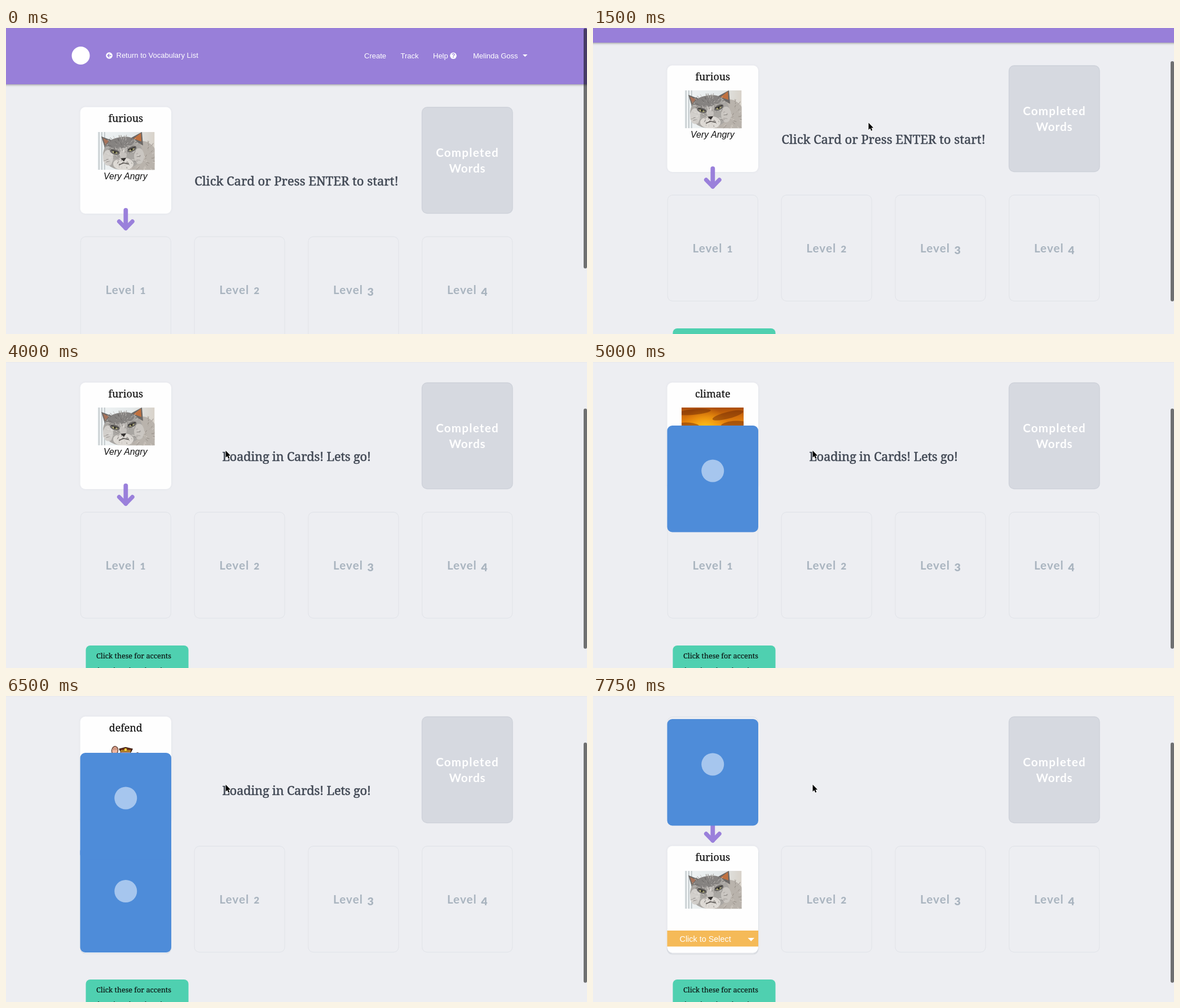
An HTML page with a canvas that plays this animation: 1030x544 px, repeating every 8000 ms.

```html
<!DOCTYPE html>
<html lang="en">
<head>
<meta charset="utf-8">
<title>Vocabulary cards</title>
<style>
html, body { margin: 0; width: 100%; height: 100%; overflow: hidden; background: #edeef2; }
canvas { display: block; }
</style>
</head>
<body>
<canvas id="stage" width="1030" height="544"></canvas>
<script>
const ctx = document.getElementById('stage').getContext('2d');
const LOOP = 8000, STEP = 250;
const SERIF = '"Noto Serif", serif';
const SANS = '"Liberation Sans", Arial, sans-serif';
const ROUND = 'Lato, sans-serif';
const PURPLE = '#987fd9', BLUE = '#4e8cd9', BG = '#edeef2';
const CARD_W = 161.5, CARD_H = 189.5, DECK_X = 131.5, DECK_Y = 140.5, LEVEL_Y = 370.5, PITCH = 201.8;

// Held values: each entry is [start time, value].
const scrollKeys = [[0, 0], [1250, 1], [1500, 74], [1750, 98], [2000, 105.5], [2250, 104]];
const pointerKeys = [[0, null], [250, [484, 38]], [500, [488, 168]], [2500, [282, 167]],
  [2750, [259, 165]], [3750, [307, 164]], [4000, [389, 157]]];
const messageKeys = [[0, 'Click Card or Press ENTER to start!'], [3250, 'Loading in Cards! Lets go!'], [7750, '']];
const deckKeys = [[0, 'furious'], [4750, 'climate'], [6250, 'defend'], [7750, null]];
const flightKeys = [[0, null], [4750, 47], [5000, 113], [5250, 208], [5500, 262], [5750, null],
  [6250, 43], [6500, 101], [6750, 197], [7000, 256], [7250, null], [7750, 41]];
const arrowKeys = [[0, 0], [6250, 3], [6500, 0], [7750, 5]];
const stackKeys = [[0, 0], [5750, 1], [6500, 2], [7250, 3]];

function at(keys, t) {
  let value = keys[0][1];
  for (const [start, v] of keys) if (t >= start) value = v;
  return value;
}

function seeded(seed) {
  return () => (seed = (seed * 16807) % 2147483647) / 2147483647;
}

function text(str, x, y, font, color, align = 'left', spacing = 0) {
  ctx.font = font;
  ctx.fillStyle = color;
  ctx.textAlign = align;
  ctx.letterSpacing = spacing + 'px';
  ctx.fillText(str, x, y);
}

// Serif text with a hairline outline for a medium weight.
function serif(str, x, y, size, color, weight, align = 'center', spacing = 0) {
  text(str, x, y, size + 'px ' + SERIF, color, align, spacing);
  ctx.strokeStyle = color;
  ctx.lineWidth = weight;
  ctx.strokeText(str, x, y);
}

function box(x, y, w, h, r, fill, stroke) {
  ctx.beginPath();
  ctx.roundRect(x, y, w, h, r);
  if (fill) { ctx.fillStyle = fill; ctx.fill(); }
  if (stroke) { ctx.strokeStyle = stroke; ctx.lineWidth = 1.3; ctx.stroke(); }
}

function oval(x, y, rx, ry, fill, turn = 0) {
  ctx.beginPath();
  ctx.ellipse(x, y, rx, ry, turn, 0, Math.PI * 2);
  ctx.fillStyle = fill;
  ctx.fill();
}

function poly(points, fill) {
  ctx.beginPath();
  points.forEach(([x, y]) => ctx.lineTo(x, y));
  ctx.closePath();
  ctx.fillStyle = fill;
  ctx.fill();
}

function rect(x, y, w, h, fill) {
  ctx.fillStyle = fill;
  ctx.fillRect(x, y, w, h);
}

function line(points, color, width) {
  ctx.beginPath();
  points.forEach(([x, y]) => ctx.lineTo(x, y));
  ctx.strokeStyle = color;
  ctx.lineWidth = width;
  ctx.lineCap = ctx.lineJoin = 'round';
  ctx.stroke();
}

// Draws into a clipped area with its own origin.
function picture(x, y, w, h, paint) {
  ctx.save();
  ctx.translate(x, y);
  ctx.beginPath();
  ctx.rect(0, 0, w, h);
  ctx.clip();
  paint(w, h);
  ctx.restore();
}

// Short hairs fanning out from the middle of a patch of coat.
function fur(cx, cy, rx, ry, colors, count, rnd) {
  for (let i = 0; i < count; i++) {
    const a = rnd() * Math.PI * 2, r = Math.sqrt(rnd()), len = 2 + rnd() * 3;
    const x = cx + rx * r * Math.cos(a), y = cy + ry * r * Math.sin(a);
    line([[x, y], [x + len * Math.cos(a), y + len * Math.sin(a)]], colors[i % colors.length], 0.9);
  }
}

function paintCat(w, h) {
  const rnd = seeded(11);
  const back = ctx.createLinearGradient(0, 0, w, 0);
  back.addColorStop(0, '#f0f4f5');
  back.addColorStop(0.6, '#e4e9ea');
  back.addColorStop(1, '#d8d2c9');
  rect(0, 0, w, h, back);
  for (let i = 0; i < 3; i++) rect(2 + i * 5, 0, 1.6, h, '#b9c1c4');
  oval(79, 54, 30, 38, '#b9b3ac');
  fur(82, 52, 26, 34, ['#928b84', '#d8d2ca', '#b0a9a1'], 90, rnd);
  poly([[7, 8], [28, 16], [14, 31]], '#6b6866');
  poly([[10, 11], [20, 16], [14, 24]], '#a8735a');
  poly([[57, 12], [79, 0], [81, 24]], '#6b6866');
  poly([[64, 12], [77, 2], [78, 17]], '#c0713f');
  oval(45, 38, 35, 29, '#a9a6a2', -0.15);
  oval(42, 19, 24, 10, '#858280', -0.15);
  fur(45, 24, 30, 15, ['#686563', '#a5a29f', '#8c8986', '#c4c1bd'], 90, rnd);
  oval(19, 46, 9, 14, '#d2cfcb');
  oval(74, 43, 9, 14, '#cac6c1');
  oval(46, 57, 18, 11, '#ddd9d4');
  oval(46, 40, 6, 12, '#c5c1bd');
  fur(45, 46, 30, 18, ['#e6e3de', '#a29e99', '#c9c5c0', '#85817d'], 100, rnd);
  for (const [x, y, turn] of [[31, 35.5, 0.3], [61, 30.5, -0.45]]) {
    oval(x, y, 9, 4.6, '#6a6765', turn);
    oval(x, y + 0.8, 4.8, 2, '#a9a574', turn);
    oval(x, y + 0.6, 1.6, 1.9, '#1c1b1a');
    line([[x - 6, y - (turn > 0 ? 3.4 : -1)], [x + 6, y + (turn > 0 ? 0.6 : -3.6)]], '#393735', 1.5);
  }
  poly([[41, 47], [51, 46], [47, 52.5]], '#33302f');
  line([[39, 58.5], [46, 55], [55, 57]], '#5a5653', 1.6);
}

function paintSunset(w, h) {
  const sky = ctx.createLinearGradient(0, 0, 0, h);
  ['#a94c09', '#d4700b', '#ee8c0d', '#df770a', '#9d4207'].forEach((c, i) => sky.addColorStop(i / 4, c));
  rect(0, 0, w, h, sky);
  const glow = ctx.createRadialGradient(42, 43, 2, 42, 43, 44);
  glow.addColorStop(0, '#ffe04a');
  glow.addColorStop(0.25, 'rgba(255,190,24,.85)');
  glow.addColorStop(1, 'rgba(255,160,10,0)');
  rect(0, 0, w, h, glow);
  const cloud = 'rgba(112,42,4,.5)';
  oval(22, 8, 30, 5, cloud, -0.1);
  oval(82, 14, 28, 6, cloud, -0.25);
  oval(92, 30, 22, 6, cloud, -0.1);
  oval(14, 31, 17, 4, cloud, 0.1);
  oval(74, 50, 24, 5, cloud, -0.05);
  oval(20, 62, 34, 7, cloud);
  oval(88, 65, 32, 6, cloud);
}

function paintGuard() {
  const coat = '#7d3b1d', dark = '#35180c', skin = '#efb6a0';
  poly([[14, 25], [37, 23], [43, 50], [10, 50]], dark);
  poly([[15, 25], [36, 25], [40, 48], [12, 48]], coat);
  line([[17, 29], [7, 27], [5, 19]], dark, 8);
  line([[17, 29], [7, 27], [5, 19]], coat, 5.5);
  oval(6, 16, 6, 8, dark, 0.15);
  oval(6, 16, 5, 7, skin, 0.15);
  for (let i = 0; i < 3; i++) line([[3 + i * 3, 10], [3.5 + i * 2.6, 15]], '#8a5545', 0.8);
  line([[37, 28], [46, 24], [40, 36]], dark, 9);
  line([[37, 28], [46, 24], [40, 36]], coat, 6.5);
  poly([[13, 47], [24, 47], [22, 57], [10, 57]], dark);
  poly([[28, 47], [40, 47], [46, 57], [31, 57]], dark);
  for (let i = 0; i < 4; i++) line([[16, 31 + i * 4], [37, 31 + i * 4]], '#b5652d', 0.8);
  oval(25, 22, 10, 9, dark);
  oval(25, 22, 9, 8, skin);
  oval(24, 25, 9, 3.4, '#b9b2ab');
  poly([[13, 13], [25, 10], [38, 13], [35, 19], [16, 19]], dark);
  poly([[15, 14], [25, 11.5], [36, 14], [34, 16], [17, 16]], coat);
  rect(16, 16, 18, 2, '#e0a92e');
  oval(25, 14.5, 2.2, 2.2, '#f6d93c');
  const star = [];
  for (let i = 0; i < 10; i++) {
    const r = i % 2 ? 2.8 : 6.5, a = i * Math.PI / 5 - Math.PI / 2;
    star.push([36 + r * Math.cos(a), 33 + r * Math.sin(a)]);
  }
  poly(star, '#f8e42c');
}

const cards = {
  furious: { notes: ['Very Angry'], x: 162, w: 101.5, paint: paintCat },
  climate: { notes: ['Weather', 'conditions'], x: 157, w: 110, paint: paintSunset },
  defend: { notes: ['To protect'], x: 187, w: 52, paint: paintGuard }
};

function cardFace(word, y, notes = true) {
  const card = cards[word], cx = DECK_X + CARD_W / 2;
  ctx.save();
  ctx.shadowColor = 'rgba(90,100,130,.08)';
  ctx.shadowBlur = 4;
  box(DECK_X, y, CARD_W, CARD_H, 9, '#fefefe');
  ctx.restore();
  serif(word, cx, y + 26.5, 17.8, '#111', 0.25);
  picture(card.x, y + 44.3, card.w, 67.5, card.paint);
  if (notes) card.notes.forEach((note, i) =>
    text(note, cx - 0.5, y + 128 + i * 19, 'italic 15.8px ' + SANS, '#111', 'center'));
}

function cardBack(y) {
  box(DECK_X, y, CARD_W, CARD_H, 9, BLUE);
  oval(DECK_X + CARD_W / 2, y + 80.5, 20, 20, '#a6c6ee');
}

function slot(i, y) {
  const x = DECK_X + 0.8 + i * PITCH, cx = x + 80.2, color = '#a9b4bf';
  box(x, y + 0.5, 160, 188.5, 9, null, '#e3e5ea');
  text('Level', cx - 36, y + 102.5, 'bold 20.5px ' + ROUND, color, 'left', 1.1);
  // Old-style figures: 1 and 2 at x-height, 3 and 4 hang below the baseline.
  const low = i > 1;
  text(i + 1, cx + 30, y + (low ? 105.5 : 102.5), `900 ${low ? 19.5 : 17}px ` + ROUND, color, 'center');
}

function levelFace(y) {
  cardFace('furious', y, false);
  rect(DECK_X, y + 150.5, CARD_W, 28.4, '#f5ba58');
  text('Click to Select', 153.5, y + 170.5, '14.4px ' + SANS, '#fff');
  poly([[274.5, y + 163.5], [286, y + 163.5], [280.2, y + 169.5]], '#fff');
}

function header() {
  ctx.save();
  ctx.shadowColor = 'rgba(0,0,0,.4)';
  ctx.shadowBlur = 4;
  ctx.shadowOffsetY = 1;
  rect(-10, -10, 1050, 110, PURPLE);
  ctx.restore();
  const font = '13px ' + SANS;
  oval(132.5, 49, 16, 16, '#fff');
  oval(183, 49, 5.8, 5.8, '#fff');
  line([[186, 49], [180.5, 49]], PURPLE, 1.6);
  line([[182.8, 46.4], [180.2, 49], [182.8, 51.6]], PURPLE, 1.6);
  text('Return to Vocabulary List', 195.5, 53.3, font, '#fff');
  text('Create', 635, 54, font, '#fff');
  text('Track', 699.5, 54, font, '#fff');
  text('Help', 757, 53.5, font, '#fff');
  oval(793, 49.3, 5.8, 5.8, '#fff');
  text('?', 793, 53, 'bold 10px ' + SANS, PURPLE, 'center');
  text('Melinda Goss', 828, 54, font, '#fff');
  poly([[916, 47], [924.5, 47], [920.2, 51.3]], '#fff');
}

function accentPanel() {
  const ink = '#0c1513';
  box(141.5, 608, 182, 110, 8, '#4fd0b0');
  serif('Click these for accents', 160, 631, 12.6, ink, 0.2, 'left');
  [...'áéíóúñ'].forEach((c, i) => serif(c, 163 + i * 27.8, 657, 12.6, ink, 0.2));
}

function arrow(shift) {
  const y = 355.5 + shift, x = 212.3, color = '#9a80db';
  line([[x, y - 31.7], [x, y]], color, 7.8);
  line([[x - 11.7, y - 11.5], [x, y + 0.5], [x + 11.7, y - 11.5]], color, 7.4);
}

function pointer([x, y]) {
  ctx.save();
  ctx.translate(x + 0.5, y + 0.5);
  const shape = [[0, 0], [0, 12.4], [2.8, 9.8], [4.7, 14.2], [6.7, 13.3], [4.9, 9.1], [8.6, 9.1], [0, 0]];
  line(shape, '#fff', 1.6);
  poly(shape, '#000');
  ctx.restore();
}

function levelOne(count, open) {
  for (let i = count - 1; i > 0; i--) box(DECK_X + 0.4, LEVEL_Y + i * 1.7, CARD_W - 0.8, CARD_H, 9, '#fefefe', '#d9dce2');
  if (open) levelFace(LEVEL_Y);
  else if (count) cardBack(LEVEL_Y);
}

function draw(t) {
  const scroll = at(scrollKeys, t), word = at(deckKeys, t), message = at(messageKeys, t);
  const flight = at(flightKeys, t), tip = at(pointerKeys, t);
  rect(0, 0, 1030, 544, BG);
  ctx.save();
  ctx.translate(0, -scroll);
  header();
  box(737.5, 141, 160.5, 188.5, 9, '#d6d9e0', '#cdd1d9');
  text('Completed', 818, 228.5, 'bold 20.5px ' + ROUND, '#fff', 'center', 1.3);
  text('Words', 818, 257, 'bold 20.5px ' + ROUND, '#fff', 'center', 1);
  for (let i = 0; i < 4; i++) slot(i, LEVEL_Y);
  serif(message, 515, 280, 22, '#414854', 0.5, 'center', message.startsWith('L') ? -0.3 : 0);
  if (word) cardFace(word, DECK_Y);
  else box(DECK_X + 0.8, DECK_Y + 0.5, 160, 188.5, 9, null, '#e3e5ea');
  arrow(at(arrowKeys, t));
  levelOne(at(stackKeys, t), t >= 7750);
  accentPanel();
  ctx.restore();
  if (flight !== null) cardBack(flight);
  box(1024, scroll * 0.79 + 0.5, 6, 427, 3, 'rgba(0,0,0,.53)');
  if (tip) pointer(tip);
}

const start = performance.now();
function tick(now) {
  const t = Math.max(0, now - start) % LOOP;
  draw(Math.floor(t / STEP) * STEP);
  requestAnimationFrame(tick);
}
draw(0);
requestAnimationFrame(tick);
</script>
</body>
</html>
```
